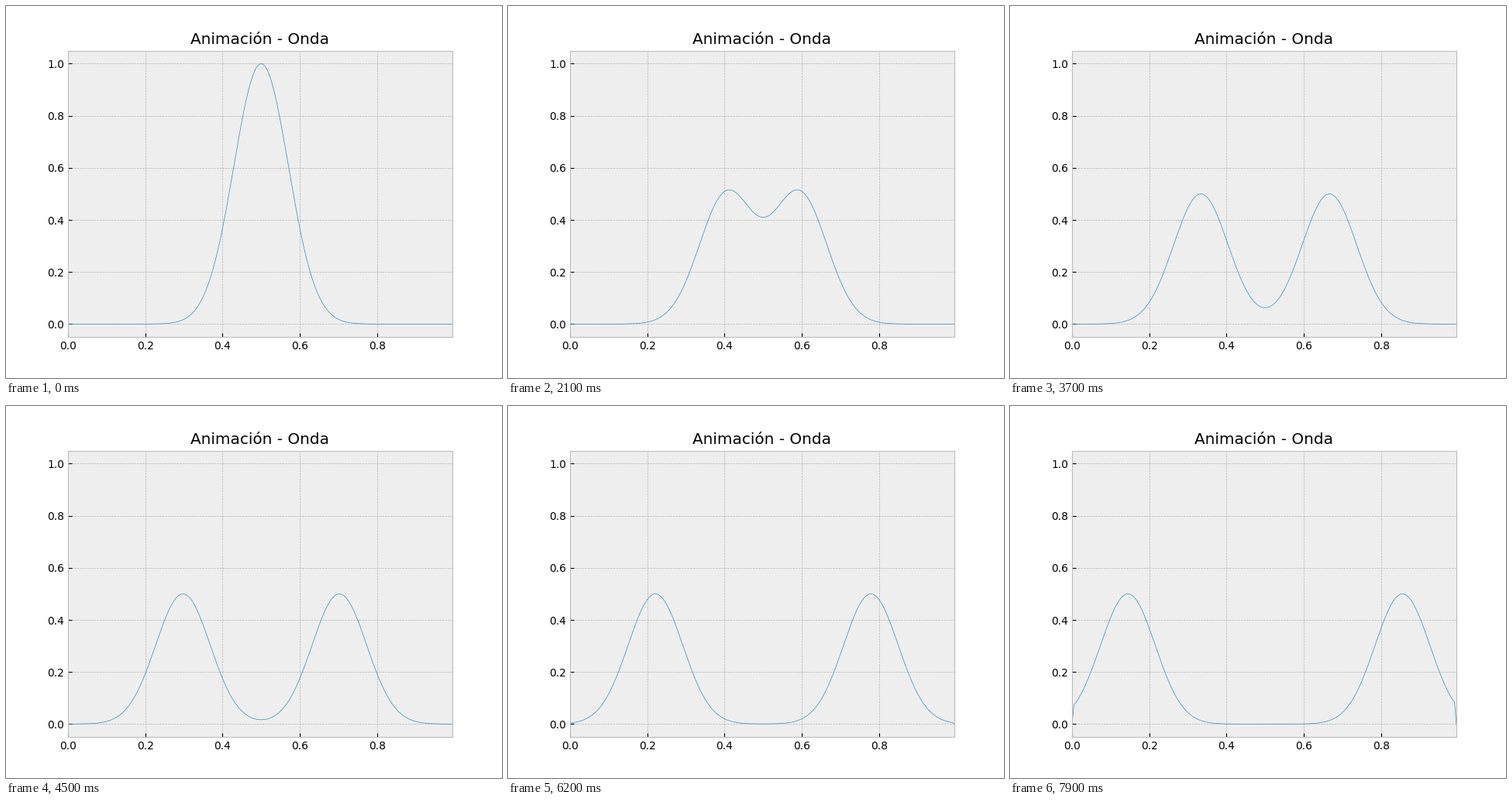
These frames come from a looping animation (640 by 480 pixels, 8000 ms). A matplotlib script:

```python
import numpy as np
import matplotlib.pyplot as plt
from matplotlib.animation import FuncAnimation

FRAMES = 80
INTERVAL = 100
DX = 0.005
DT = 0.0045
C = 1.0

plt.style.use("bmh")


def lax_wendroff(a, b, k):
    """Interior update of a, coupled to b, with Courant number k."""
    new = a.copy()
    new[1:-1] += (0.5 * k * (b[2:] - b[:-2])
                  + 0.5 * k**2 * (a[2:] - 2 * a[1:-1] + a[:-2]))
    return new


def solve(x, steps):
    """Wave equation as a first-order system: r = c u_x, s = u_t."""
    u = np.exp(-100 * (x - 0.5)**2)
    r = -200 * C * (x - 0.5) * u
    s = np.zeros_like(x)
    k = C * DT / DX
    history = [u]
    for _ in range(steps - 1):
        r_new, s_new = lax_wendroff(r, s, k), lax_wendroff(s, r, k)
        u = u.copy()
        u[1:-1] += 0.5 * DT * (s + s_new)[1:-1]
        r, s = r_new, s_new
        history.append(u)
    return history


x = DX * np.arange(200)
waves = solve(x, FRAMES)

fig, ax = plt.subplots(figsize=(6.4, 4.8), dpi=100)
line, = ax.plot(x, waves[0], linewidth=0.5)
ax.set_xlim(0, x[-1])
ax.set_ylim(-0.05, 1.05)
ax.set_title("Animación - Onda")


def update(i):
    line.set_ydata(waves[i])
    return line,


anim = FuncAnimation(fig, update, frames=FRAMES, interval=INTERVAL,
                     repeat=True, repeat_delay=0)
plt.show()
```
